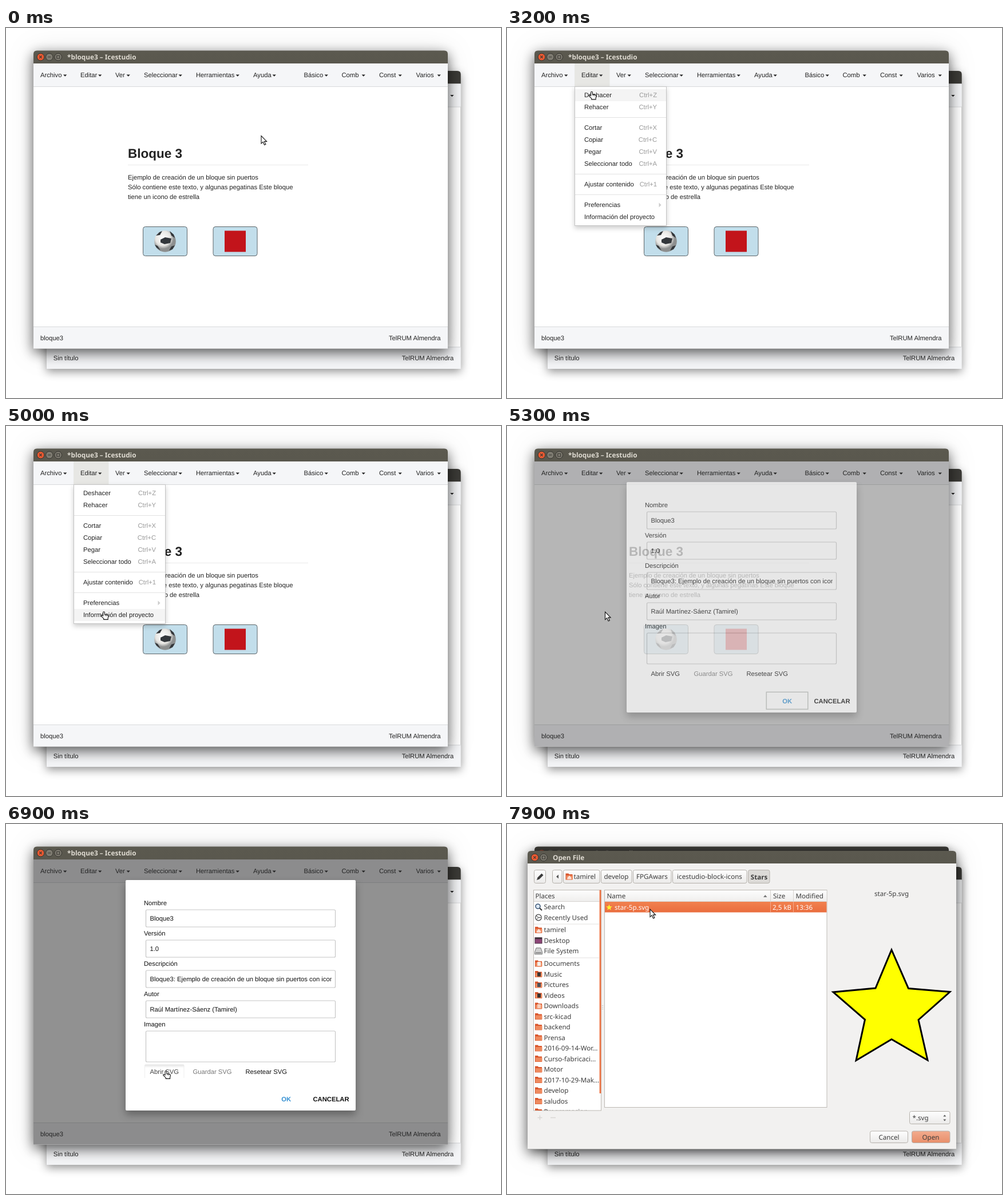
Recreate the animation shown at these times as an HTML page. Size 865 px wide and 647 px high, loop 8 s.

```html
<!DOCTYPE html>
<html lang="es">
<head>
<meta charset="utf-8">
<title>Icestudio</title>
<style>
  html, body { margin: 0; width: 100%; height: 100%; overflow: hidden; background: #fff; }
  svg { display: block; width: 100%; height: 100%; }
  text { font: 11.24px "Liberation Sans", Arial, sans-serif; fill: #222; white-space: pre; text-rendering: geometricPrecision; }
  .gtk text, .title { font: 11.6px "Noto Sans", "Open Sans", sans-serif; fill: #3c3c3c; }
  text.title { font-size: 11.8px; font-weight: bold; fill: #dfdbd2; }
  .gtk text.bold, .bold { font-weight: bold; }
  .gtk text.white { fill: #fff; }
  .end { text-anchor: end; }
  .mid { text-anchor: middle; }
  text.h1 { font-size: 22.5px; font-weight: bold; }
  text.key { fill: #999; }
  #modal text { fill: #111; }
  #modal text.off { fill: #777; }
  #modal text.ok { fill: #3490d2; }
  .back { filter: drop-shadow(0 5px 8px rgba(0,0,0,.42)); }
  .front { filter: drop-shadow(0 7px 11px rgba(0,0,0,.62)) drop-shadow(0 0 22px rgba(0,0,0,.1)); }
  .drop { filter: drop-shadow(0 4px 4px rgba(0,0,0,.2)); }
  .deep { filter: drop-shadow(0 7px 7px rgba(0,0,0,.32)); }
</style>
</head>
<body>
<script>
const rect = (x, y, w, h, fill, more = '') => `<rect x="${x}" y="${y}" width="${w}" height="${h}" fill="${fill}" ${more}/>`;
const text = (x, y, s, cls = '') => `<text x="${x}" y="${y}" class="${cls}">${s}</text>`;
const path = (d, fill, more = '') => `<path d="${d}" fill="${fill}" ${more}/>`;
const circle = (x, y, r, fill, more = '') => `<circle cx="${x}" cy="${y}" r="${r}" fill="${fill}" ${more}/>`;
const group = (id, body, more = '') => `<g id="${id}" ${more}>${body}</g>`;
const grad = (id, a, b) => `<linearGradient id="${id}" x2="0" y2="1"><stop stop-color="${a}"/><stop offset="1" stop-color="${b}"/></linearGradient>`;
const rows = (list, fn) => list.map(fn).join('');

const frame = (x, y, w, h, fill, cls, id) => path(
  `M${x} ${y + h}V${y + 6}q0-6 6-6H${x + w - 6}q6 0 6 6V${y + h}z`, fill, `class="${cls}" id="${id}"`);

const round = (x, y, fill, mark) => circle(x, y, 6.3, fill, 'stroke="#33322e"') +
  path(mark, 'none', `transform="translate(${x} ${y})" stroke="#3a3833" stroke-width="1.1"`);
const cross = 'M-2.2-2.2L2.2 2.2M2.2-2.2L-2.2 2.2', dash = 'M-2.5 0h5', box = 'M-2.5-2.5h5v5h-5z';

const BAR = [['Archivo', 60, 100], ['Editar', 130, 161], ['Ver', 191, 210.5], ['Seleccionar', 241, 301.5],
  ['Herramientas', 332, 401.5], ['Ayuda', 432, 465.5], ['Básico', 520.5, 556.5], ['Comb', 586.5, 621.5],
  ['Const', 652, 685.5], ['Varios', 716.5, 753.5]];

const appWindow = (id, titleFill, shadow, file) =>
  frame(48, 39.5, 724, 521, titleFill, shadow, id) +
  rect(48, 62, 724, 498.5, '#fff') + rect(48, 62, 724, 40, '#f5f6f8') + rect(48, 102, 724, 1, '#d8dadb') +
  rect(118, 62, 61.5, 40, '#e7e7e4', `id="${id}Active" visibility="hidden"`) +
  rows(BAR, ([s, x, c]) => text(x, 86, s) + path(`M${c} 81.5h6.4l-3.2 3.3z`, '#222')) +
  rect(48, 522, 724, 38.5, '#f5f6f8') + rect(48, 522, 724, 1, '#d8dadb') +
  text(60, 545.5, file) + text(759.5, 545.5, 'TelRUM Almendra', 'end');

const sticker = x => rect(x, 347.5, 77, 51, '#c2deeb', 'rx="4" stroke="#5c6468"');
const ball = circle(278, 373, 18.8, 'url(#ball)') +
  path('M270 370l8-4 11 2-2 8-10 2-7-3zM262 363l6-6 5-2-4 7zM286 355l7 6 2 6-6-4zM260 379l5 2 5 8-7-5zM285 389l4-7 6-2-4 7z', '#33373b');

const page = text(213, 227, 'Bloque 3', 'h1') + rect(213, 239, 315, 1, '#e9e9e9') +
  rows(['Ejemplo de creación de un bloque sin puertos', 'Sólo contiene este texto, y algunas pegatinas Este bloque',
    'tiene un icono de estrella'], (s, i) => text(213, 265 + 17 * i, s)) +
  sticker(239.5) + ball + sticker(362) + rect(382, 354.5, 37, 37, '#c2141b');

const ITEMS = [['Deshacer', 117, 'Ctrl+Z'], ['Rehacer', 138, 'Ctrl+Y'], ['Cortar', 174, 'Ctrl+X'], ['Copiar', 195, 'Ctrl+C'],
  ['Pegar', 216, 'Ctrl+V'], ['Seleccionar todo', 237, 'Ctrl+A'], ['Ajustar contenido', 273, 'Ctrl+1'],
  ['Preferencias', 309, ''], ['Información del proyecto', 330, '']];
const menu = rect(118.5, 102.5, 160, 243, '#fff', 'class="drop" stroke="#c4c4c4"') +
  rect(119, 0, 159, 21, '#f4f4f4', 'id="hover"') +
  rows([156, 255, 291], y => rect(119, y, 159, 1, '#e2e2e2')) +
  rows(ITEMS, ([s, y, k]) => text(135, y + 4, s) + text(262, y + 4, k, 'key end')) +
  path('M265.5 305.5v8l4-4z', '#ccc');

const FIELDS = [['Nombre', 'Bloque3'], ['Versión', '1.0'],
  ['Descripción', 'Bloque3: Ejemplo de creación de un bloque sin puertos con icono de estrella'],
  ['Autor', 'Raúl Martínez-Sáenz (Tamirel)'], ['Imagen', '']];
const modal = rect(209, 98, 402, 403, '#fff', 'class="deep" rx="2"') +
  rows(FIELDS, ([label, value], i) => text(241, 142 + 53 * i, label) +
    rect(244.5, 150 + 53 * i, 331, i < 4 ? 30 : 54, 'none', 'rx="2" stroke="#c6c6c6" stroke-width="1.2"') +
    `<g clip-path="url(#field)">${text(251.5, 169 + 53 * i, value)}</g>`) +
  group('press', rect(242, 420.5, 69.5, 6, 'url(#inset)', 'rx="2"') +
    path('M242.5 444V423M311 444V423', 'none', 'stroke="#eee"')) +
  text(251.5, 437, 'Abrir SVG', 'open') + text(326.5, 437, 'Guardar SVG', 'off') + text(418.5, 437, 'Resetear SVG') +
  rect(453.3, 465.3, 72.5, 30, 'none', 'id="focus" stroke="#bdbfbd" stroke-width="1.5"') +
  text(489.7, 484.5, 'OK', 'bold mid ok') + text(536.5, 484.5, 'CANCELAR', 'bold');

const button = (x, y, w, h, fill = 'url(#btn)') => rect(x + .5, y + .5, w - 1, h - 1, fill, 'rx="3" stroke="#b5b1ab"');
const folder = (x, y) => path(`M${x} ${y - 5.5}h5l1 1.5h6v9.5h-12z`, '#d9562c') + rect(x + 1, y - 2, 11.5, 7, '#ee8a5f');
const home = (x, y) => folder(x, y) + path(`M${x + 3} ${y + 2}l3.5-4 3.5 4v2.5h-7z`, '#fbe3d8');
const emblem = (x, y, fill) => folder(x, y) + rect(x + 4, y - 3, 6, 7, fill);

const PLACES = ['Search', 'Recently Used', 'tamirel', 'Desktop', 'File System', 'Documents', 'Music', 'Pictures', 'Videos',
  'Downloads', 'src-kicad', 'backend', 'Prensa', '2016-09-14-Wor…', 'Curso-fabricaci…', 'Motor', '2017-10-29-Mak…',
  'develop', 'saludos', 'Programacion'];
const placeIcon = (i, y) => [
  () => circle(54, y - 1, 4, '#dbe7f3', 'stroke="#3d5878" stroke-width="1.6"') + path(`M57 ${y + 2}l4 4`, 'none', 'stroke="#333" stroke-width="2"'),
  () => circle(55, y, 5.3, '#f4f4f4', 'stroke="#444" stroke-width="1.2"') + path(`M51 ${y - 3}L55 ${y}H59M52 ${y + 3}l3-3`, 'none', 'stroke="#444"'),
  () => home(49, y),
  () => rect(49, y - 5, 12, 10, '#8d4677', 'stroke="#4a2a42"') + rect(49, y - 5, 12, 2.5, '#3d3438'),
  () => path(`M51 ${y - 5.5}h8l2.5 7v4h-13v-4z`, '#d0d0d0', 'stroke="#777"') + rect(50, y + 2, 10, 2, '#888'),
  () => emblem(49, y, '#f5efe9'), () => emblem(49, y, '#3c3431'), () => emblem(49, y, '#4d5058'),
  () => emblem(49, y, '#37302e'), () => emblem(49, y, '#f7cdb8')
][i]?.() ?? folder(49, y);
const place = (s, i) => {
  const y = 145 + 18.5 * i + 3.25 * ((i > 1) + (i > 4));
  return placeIcon(i, y) + text(64.5, y + 4.2, s);
};

const starPoints = (cx, cy, r, inner) => Array.from({ length: 10 }, (_, i) => {
  const a = Math.PI * (i / 5 - .5), d = i % 2 ? inner : r;
  return `${cx + d * Math.cos(a)},${cy + d * Math.sin(a)}`;
}).join(' ');

const picker = frame(36, 47, 749, 521.5, 'url(#bar)', 'front', 'pickerBar') + rect(36, 69, 749, 499.5, '#f2f1f0') +
  round(48.5, 58.5, '#ea5a32', cross) + round(64, 58.5, '#7d7a70', box) + text(80, 62.8, 'Open File', 'title') +
  button(47, 80, 21, 24) + path('M52 98l1.5-4.5 7-7 3 3-7 7z', '#3a3a3a') +
  button(79, 80, 17.5, 24) + path('M90 88.5v7l-4-3.5z', '#555') +
  button(98, 80, 64.5, 24) + home(102.5, 92) + text(116.5, 96.2, 'tamirel') +
  button(164, 80, 54.5, 24) + text(191, 96.2, 'develop', 'mid') +
  button(220, 80, 67.5, 24) + text(253.5, 96.2, 'FPGAwars', 'mid') +
  button(289, 80, 130.5, 24) + text(354, 96.2, 'icestudio-block-icons', 'mid') +
  button(421, 80, 38.5, 24, '#dcdad7') + text(440.5, 96.7, 'Stars', 'mid bold') +
  rect(46.5, 115.5, 118, 385.5, '#fff', 'stroke="#bdb9b4"') + rect(47, 116, 114.5, 19.5, 'url(#head)') +
  rect(47, 135, 114.5, 1, '#d6d3cf') + text(49.5, 130, 'Places') +
  `<g clip-path="url(#places)">${rows(PLACES, place)}</g>` +
  rect(47, 174.5, 114, 1, '#e4e2e0') + rect(47, 233.5, 114, 1, '#e4e2e0') + rect(161.6, 115.5, 2.8, 355.5, '#ee7647') +
  rows([317, 320, 323], y => rect(165.8, y, 2.5, 1, '#c9c6c2')) +
  path('M53.5 513.5h8M57.5 509.5v8M76 513.5h9', 'none', 'stroke="#d9d7d4" stroke-width="1.4"') +
  rect(170.5, 115.5, 388.5, 380, '#fff', 'stroke="#bdb9b4"') + rect(171, 116, 387.5, 19.5, 'url(#head)') +
  rect(171, 135, 387.5, 1, '#d6d3cf') + rect(460, 116, 1, 19, '#d6d3cf') + rect(500, 116, 1, 19, '#d6d3cf') +
  text(174.5, 130, 'Name') + text(465, 130, 'Size') + text(504.5, 130, 'Modified') + path('M448 128h6.5l-3.2-4z', '#777') +
  rect(171, 136, 387.5, 18.5, 'url(#row)') + rect(460, 136, 1, 18.5, '#f6a888') + rect(500, 136, 1, 18.5, '#f6a888') +
  `<polygon points="${starPoints(178.5, 146, 5.6, 2.5)}" fill="#ffef2e"/>` +
  text(188, 149.7, 'star-5p.svg', 'white') + text(464, 149.7, '2,5 kB', 'white') + text(504.5, 149.7, '13:36', 'white') +
  text(672, 126, 'star-5p.svg', 'mid') +
  path('M672 220L701.5 287.5 774 293.5 719 342.5 735 413 672 376.5 610 413.5 625.5 342 570 294 644 287z', '#ff0', 'stroke="#000" stroke-width="3"') +
  button(703, 502, 71.5, 23) + text(708.5, 517.7, '*.svg') + path('M762.3 511.5h5l-2.5-3zM762.3 516.5h5l-2.5 3z', '#555') +
  button(634, 536.5, 67, 21.5) + text(667.5, 551.5, 'Cancel', 'mid') +
  button(707, 536.5, 67.5, 21.5, 'url(#openBtn)') + text(740.5, 551.5, 'Open', 'mid');

const pointer = group('arrow', path('M.5 .5v13.6l3.1-2.9 2.5 5.3 2.3-1-2.5-5.1h4.2z', '#fff', 'stroke="#111" stroke-width="1.1"')) +
  group('hand', path('M-1.4 1.6a1.4 1.4 0 0 1 2.8 0V5.2l4.6.7q2 .4 2 2.2l-.9 3.6v2.2h-7.4v-1.7l-4.1-4q-1-1.6.7-1.9l2.3 1.2z', '#fff',
    'stroke="#111" stroke-width="1.1"') + path('M2.4 6v2M5 6.4v2', 'none', 'stroke="#111" stroke-width=".7"'));

document.body.innerHTML = `<svg viewBox="0 0 865 647"><defs>
  ${grad('bar', '#5b594f', '#3c3b37')}${grad('btn', '#fefefe', '#ebeae9')}${grad('head', '#fdfdfd', '#efeeed')}
  ${grad('row', '#f1814f', '#ea6d3e')}${grad('openBtn', '#f2ab8d', '#e88f6b')}${grad('inset', '#e2e2e2', '#fff')}
  <radialGradient id="ball" cx=".4" cy=".35"><stop stop-color="#fff"/><stop offset=".7" stop-color="#e6e5e2"/><stop offset="1" stop-color="#8d8f8f"/></radialGradient>
  <clipPath id="field">${rect(245, 140, 324, 300, '#000')}</clipPath>
  <clipPath id="places">${rect(47, 116, 114.5, 385, '#000')}</clipPath></defs>
  <g transform="translate(22.7 35.5)">${appWindow('rear', '#3c3b37', 'back', 'Sin título')}</g>
  ${appWindow('main', 'url(#bar)', 'front', 'bloque3')}
  ${group('caption', round(60.5, 50.7, '#ea5a32', cross) + round(75.8, 50.7, '#7d7a70', dash) + round(91.2, 50.7, '#7d7a70', box) +
    text(107, 54.6, '*bloque3 – Icestudio', 'title'))}
  ${page}${group('menu', menu)}
  ${rect(48, 62, 724, 498.5, '#252525', 'id="dim"')}
  ${group('modal', modal)}${group('picker', picker, 'class="gtk"')}${group('pointer', pointer)}</svg>`;

const el = id => document.getElementById(id);
const show = (id, on) => el(id).setAttribute('visibility', on ? 'visible' : 'hidden');
const fade = (id, v) => { el(id).setAttribute('opacity', v); show(id, v > 0); };
const openLabel = document.querySelector('.open');

// Pointer moves: start, end, x, y, smooth
const MOVES = [[800, 1700, 156, 112, 1], [1700, 1800, 152, 101], [1800, 2000, 147.5, 88], [3100, 3200, 148, 111],
  [3200, 3300, 148, 133], [3400, 3700, 150, 172], [3800, 3900, 152, 198], [4000, 4200, 157, 265], [4300, 4500, 163, 300],
  [4600, 4700, 164, 317], [4800, 5000, 171, 324.5], [5800, 5900, 172, 317], [5900, 6000, 187, 339], [6100, 6400, 299, 410],
  [6500, 6600, 283, 421], [6700, 6900, 279.5, 431.5], [7600, 7900, 249.5, 148.5]];

function pointerAt(t) {
  let x = 445.5, y = 188;
  for (const [a, b, tx, ty, smooth] of MOVES) {
    if (t <= a) break;
    let p = Math.min(1, (t - a) / (b - a));
    if (smooth) p = p * p * (3 - 2 * p);
    x += (tx - x) * p;
    y += (ty - y) * p;
  }
  return [x, y];
}

function draw() {
  const t = Math.floor(performance.now() % 8000 / 100) * 100; // ten steps a second
  const within = (a, b) => t >= a && t < b;
  const [x, y] = pointerAt(t);
  el('pointer').setAttribute('transform', `translate(${x} ${y})`);
  const hand = within(1900, 5300) || within(6600, 7100);
  show('hand', hand);
  show('arrow', !hand);

  const open = within(2200, 5300);
  show('menu', open);
  show('mainActive', open);
  const item = open && ITEMS.find(i => Math.abs(y - i[1]) <= 10.5);
  show('hover', item);
  if (item) el('hover').setAttribute('y', item[1] - 10);

  const shown = t < 5300 ? 0 : t < 5500 ? .67 : t < 5600 ? .93 : 1;
  fade('modal', shown);
  fade('dim', shown / 2);
  show('focus', within(5300, 6800));
  fade('press', t < 6800 ? 0 : t < 6900 ? .5 : 1);
  openLabel.style.fill = t < 6600 ? '#111' : '#444';

  const blurred = t >= 7100;
  fade('picker', !blurred ? 0 : t < 7200 ? .5 : 1);
  fade('caption', blurred ? .35 : 1);
  el('main').setAttribute('fill', blurred ? '#3c3b37' : 'url(#bar)');
  el('main').setAttribute('class', blurred ? 'back' : 'front');
  requestAnimationFrame(draw);
}
draw();
</script>
</body>
</html>
```
